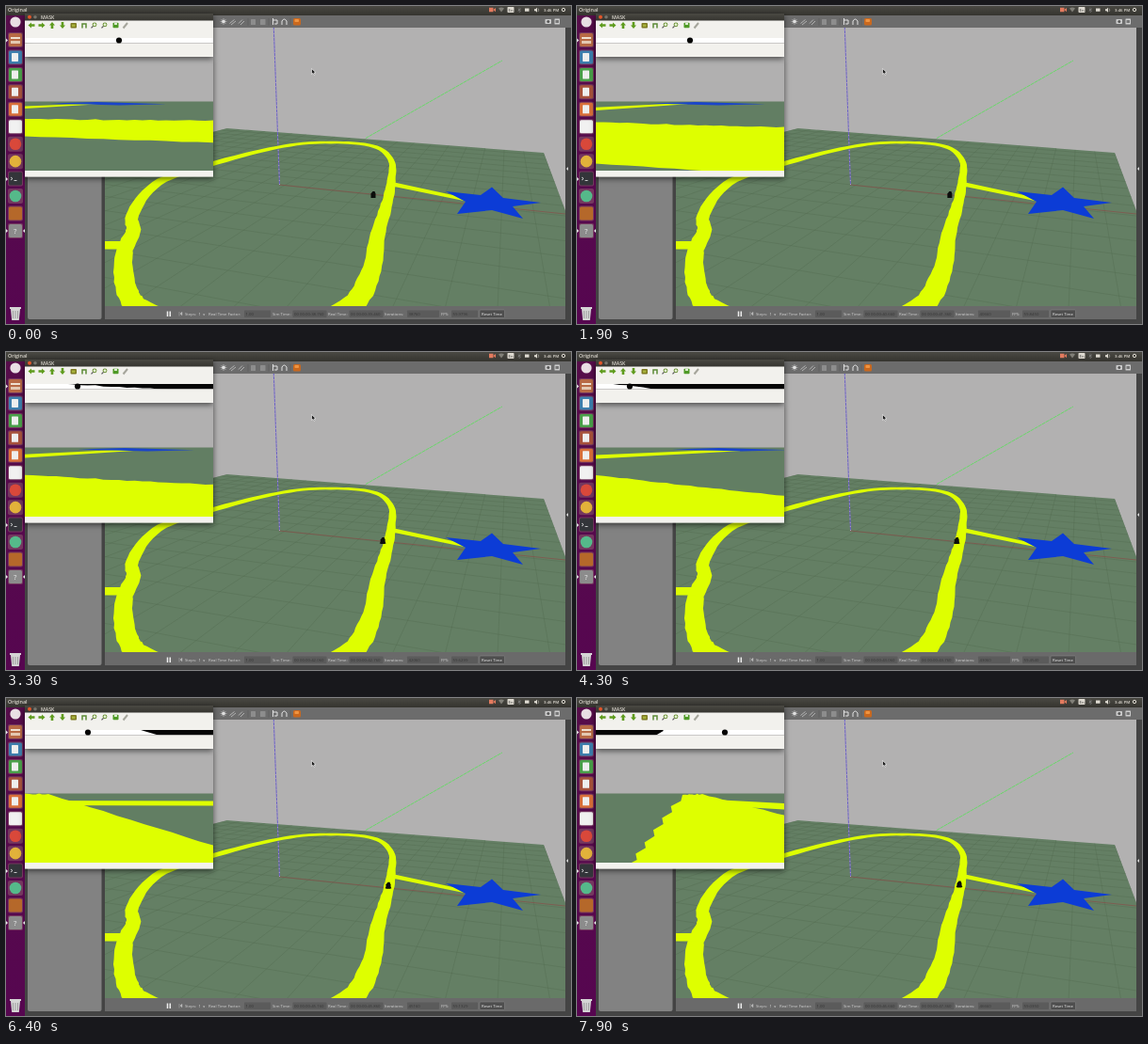
These frames come from a looping animation (600x338 px, 8 s). An HTML page:

```html
<!DOCTYPE html>
<html lang="en">
<head>
<meta charset="utf-8">
<title>Line follower simulation</title>
<style>
  html, body { margin: 0; width: 100%; height: 100%; overflow: hidden; background: #444; }
  svg { display: block; width: 100vw; height: 100vh; }
  text { font-family: "Open Sans", "Noto Sans", sans-serif; font-size: 4.3px; fill: #d2d2d2; }
  .title { font-size: 5.4px; font-weight: 600; fill: #dfdbd2; }
  .val { fill: #353535; }
  .yellow { fill: #deff00; }
</style>
</head>
<body>
<svg viewBox="0 0 600 338" preserveAspectRatio="none">
  <defs>
    <linearGradient id="dock" x2="0" y2="1">
      <stop offset="0" stop-color="#560d4a"/><stop offset="1" stop-color="#560650"/>
    </linearGradient>
    <linearGradient id="bar" x2="0" y2="1">
      <stop offset="0" stop-color="#4a4943"/><stop offset="1" stop-color="#35342f"/>
    </linearGradient>
    <clipPath id="scene"><rect x="105" y="23" width="489" height="296"/></clipPath>
    <clipPath id="floor"><path d="M235 130 571 156 600 234V320H105V163Z"/></clipPath>
    <clipPath id="camera"><rect x="20" y="54" width="200" height="121"/></clipPath>
    <clipPath id="strip"><rect x="20" y="34" width="200" height="5.3"/></clipPath>
    <filter id="shadow" x="-10%" y="-10%" width="120%" height="150%">
      <feDropShadow dx="0" dy="2" stdDeviation="3" flood-opacity=".6"/>
    </filter>
    <filter id="soft"><feGaussianBlur stdDeviation=".45"/></filter>
  </defs>

  <!-- simulator window -->
  <rect width="600" height="338" fill="#444"/>
  <rect x="22" y="10" width="578" height="13" fill="#6c6c6c"/>
  <rect x="23" y="23" width="78.500" height="310" rx="2" fill="#828282"/>
  <path d="M103 171v5" stroke="#aaa" stroke-width=".7" stroke-dasharray="1 1"/>
  <g id="tools"></g>

  <g clip-path="url(#scene)">
    <rect x="105" y="23" width="489" height="296" fill="#b2b1b1"/>
    <path d="M235 130 571 156 600 234V320H105V163Z" fill="#647f64"/>
    <path id="grid" clip-path="url(#floor)" fill="none" stroke="#50684f" stroke-width=".5" opacity=".75"/>
    <path d="M290 190 594 221" stroke="#874f49" stroke-width=".7"/>
    <path d="M382 140.500 527 58" stroke="#6ad86a" stroke-width="1" stroke-dasharray="4 .6"/>
    <path d="M290.500 190 284.300 23" stroke="#6a62c6" stroke-width="1"/>
    <path d="M290.500 190 284.300 23" stroke="#b59bc6" stroke-width="1" stroke-dasharray="1 3"/>
    <g class="yellow">
      <path id="track"/>
      <path d="M105 250h21v8.500h-21zM410 187 493 205 491 208 410 191.500z"/>
    </g>
    <path d="M516 192.500 528 204 568 209 538 213 549 226 516 217 479 221 488 208 467 197 504 201Z" fill="#0c3cd6"/>
    <g id="robot" fill="#0b0d0b">
      <path d="M-2.500 3.500V-1L-.500-3.500H1.500L2.500-1V3.500Z"/>
      <path id="skirt" d="M-3.500 3 0-2 3.500 3Z"/>
    </g>
  </g>
  <path d="M597 171v4l-2-2z" fill="#ddd"/>
  <path d="M324.500 66.500v6l1.500-1.200 1 2 1-.5-.9-1.900 1.900-.1z" fill="#222" stroke="#fff" stroke-width=".6"/>

  <!-- status bar -->
  <rect x="105" y="319" width="489" height="14" fill="#6a6a6a"/>
  <path d="M171.500 324.500v5.500M174.300 324.500v5.500" stroke="#eee" stroke-width="1.500"/>
  <path d="M184 325v4.500M185 327l2-1.700v3.500z" stroke="#bbb" stroke-width=".5" fill="#bbb"/>
  <path d="M209 327.500h2.400l-1.200 1.500z" fill="#ccc"/>
  <g id="status"></g>
  <rect x="503" y="323" width="26.500" height="8.500" rx="1" fill="#4e4e4e" stroke="#8a8a8a" stroke-width=".5"/>
  <text x="505" y="328.900" style="fill:#eee">Reset Time</text>

  <!-- desktop bar -->
  <rect width="600" height="10" fill="url(#bar)"/>
  <text class="title" x="2" y="6.300">Original</text>
  <g fill="#dfdbd2">
    <path d="M513 1.700h4.500v4.500H513zM517.500 4 520 2v4.200z" fill="#e27a5e"/>
    <path d="M523 2.500q3-2 6 0l-3 4z" opacity=".4"/>
    <rect x="532.500" y="1" width="7" height="6" rx=".8"/>
    <path d="M545 1.500v5.200l1.700-1.400-3-2.400m0 2.200 3-2.200z" fill="none" stroke="#888" stroke-width=".5"/>
    <path d="M551 2.600h4.500v3.200H551zM561 3.200h1.300l1.700-1.500v5l-1.700-1.500H561z"/>
    <path d="M565 2.500q1.500 1.700 0 3.500" fill="none" stroke="#dfdbd2" stroke-width=".5"/>
    <circle cx="592" cy="4" r="1.700" fill="none" stroke="#dfdbd2" stroke-width="1"/>
  </g>
  <text x="533.500" y="5.700" style="fill:#333">En</text>
  <text class="title" x="571" y="5.700" style="font-size:4.300px">3:46 PM</text>

  <!-- launcher -->
  <rect y="10" width="20" height="328" fill="url(#dock)"/>
  <g id="icons"></g>
  <path d="M0 34.500v4l2-2zM0 182v4l2-2zM0 237v4l2-2zM20 237v4l-2-2z" fill="#eee"/>

  <!-- camera window -->
  <rect x="20" y="54" width="200" height="127.500" fill="#f3f2ee" filter="url(#shadow)"/>
  <g clip-path="url(#camera)">
    <rect x="20" y="54" width="200" height="48" fill="#b1b0b0"/>
    <rect x="20" y="101.500" width="200" height="74" fill="#627e63"/>
    <path id="branch" class="yellow"/>
    <path id="star" fill="#1a44ca"/>
    <path id="line" class="yellow" filter="url(#soft)"/>
  </g>

  <!-- mask window: a thin slice of the camera view, thresholded -->
  <rect x="20" y="8" width="200" height="46" fill="#f2f1ed" filter="url(#shadow)"/>
  <path d="M20 8h200v7.500H20z" fill="url(#bar)"/>
  <circle cx="25" cy="11.800" r="2" fill="#e2562a"/>
  <circle cx="31" cy="11.800" r="1.800" fill="#77756d"/>
  <text class="title" x="37" y="13.800" style="font-size:5.200px">MASK</text>
  <g id="buttons"></g>
  <g clip-path="url(#strip)">
    <rect x="20" y="34" width="200" height="6" fill="#050505"/>
    <use href="#line" y="-99" style="filter:brightness(5) grayscale(1) brightness(5)"/>
  </g>
  <circle id="ball" cy="36.500" r="3.100" fill="#050505"/>
</svg>

<script>
const LOOP = 8000, STEP = 100;
const $ = id => document.getElementById(id);
const set = (id, name, value) => $(id).setAttribute(name, value);
const mix = (a, b, k) => a + (b - a) * k;
const ramp = (t, from, to) => Math.max(0, Math.min(1, (t - from) / (to - from)));
const smooth = k => k * k * (3 - 2 * k);
const noise = n => { const v = Math.sin(n * 12.9898) * 43758.5453; return (v - Math.floor(v)) * 2 - 1; };
const toPath = pts => 'M' + pts.map(p => p.map(v => v.toFixed(2)).join(' ')).join('L') + 'Z';
const rect = (x, y, w, h, fill, r = 0) =>
  `<rect x="${x}" y="${y}" width="${w}" height="${h}" rx="${r}" fill="${fill}"/>`;
const dot = (x, y, r, fill) => `<circle cx="${x}" cy="${y}" r="${r}" fill="${fill}"/>`;
const stroke = (d, color, width) => `<path d="${d}" fill="none" stroke="${color}" stroke-width="${width}"/>`;

// Perspective grid: one family per vanishing point.
function drawGrid() {
  let d = '';
  for (let i = 0; i <= 20; i++) {
    const t = i / 20, f = t / (t + 1.286 * (1 - t));
    const x = 235 + 336 * f, y = 130 + 26 * f;
    d += `M${x} ${y}L${533 + (x - 533) * 9} ${55 + (y - 55) * 9}`;
    const px = 531 - 390 / (i / 10 + 0.62), py = 190 - (px - 290) * 0.54;
    const slope = (py - 5) / (px + 1400);
    d += `M100 ${py + (100 - px) * slope}L600 ${py + (600 - px) * slope}`;
  }
  set('grid', 'd', d);
}

// Smooth course through a few knots; the tape widens with nearness and
// is foreshortened where it runs across the view.
function drawTrack() {
  const knots = [
    [310, 344], [366, 319], [387, 284], [395, 243], [405, 208], [409, 186], [409, 164],
    [390, 149], [345, 145], [295, 149], [225, 166], [163, 187], [135, 220],
    [135, 240], [125, 264], [128, 300], [144, 322], [200, 344]];
  const at = i => knots[Math.max(0, Math.min(knots.length - 1, i))];
  const spline = (i, t) => [0, 1].map(c => {
    const [a, b, e, f] = [at(i - 1)[c], at(i)[c], at(i + 1)[c], at(i + 2)[c]];
    return b + t / 2 * (e - a + t * (2 * a - 5 * b + 4 * e - f + t * (3 * (b - e) + f - a)));
  });
  const mid = [], left = [], right = [];
  for (let i = 0; i < knots.length - 1; i++)
    for (let j = 0; j < 8; j++) mid.push(spline(i, j / 8));
  mid.forEach(([x, y], i) => {
    const a = mid[Math.max(0, i - 1)], b = mid[Math.min(mid.length - 1, i + 1)];
    const dx = b[0] - a[0], dy = b[1] - a[1], len = Math.hypot(dx, dy);
    const w = (y - 110) * (0.075 + 0.045 * Math.abs(dy) / len);
    const side = (s, n) => {
      const h = s * w * (0.5 + noise(n) * 0.035);
      return [x - dy / len * h, y + dx / len * h];
    };
    left.push(side(1, i + 1));
    right.unshift(side(-1, i + 500));
  });
  set('track', 'd', toPath(left.concat(right)));
}

function drawIcons() {
  const colors = ['#b86a45', '#3d7fae', '#4aa04a', '#a8533c', '#d9703a', '#f1f1f1',
    '#d9483a', '#e2b23a', '#33353a', '#55b98a', '#b5682a', '#8c8c8c'];
  const round = ['#e2b23a', '#55b98a', '#d9483a'];
  let s = dot(10, 17, 5.6, '#e9dfe4');
  colors.forEach((c, i) => {
    const y = 36 + i * 18.45;
    s += rect(2, y - 8, 16, 16, '#74385f', 2);
    s += round.includes(c) ? dot(10, y, 6.3, c) : rect(3, y - 7, 14, 14, c, 1.5);
    if (i > 0 && i < 5) s += rect(6, y - 4.5, 7, 9, '#eee', .6);
  });
  s += rect(5, 33, 10, 2, '#efe0d0') + rect(5, 37, 10, 3, '#e4c9b2');
  s += stroke('M5 182l2 1.500-2 1.500M8.500 185.500h3', '#eee', .8);
  s += '<text x="8" y="242" style="font-size:8px;fill:#eee">?</text>';
  s += '<path d="M5 322h10l-1.200 12H6.200zM4 320h12v2H4z" fill="#d5d5d5"/>' +
    stroke('M7.500 324v8M10 324v8M12.500 324v8', '#888', .7);
  $('icons').innerHTML = s;
}

function drawButtons() {
  const green = '#5f9c1e';
  let s = '';
  [0, 180, 90, 270].forEach((turn, i) => {
    s += `<path transform="translate(${27 + 11 * i} 20.5) rotate(${turn})"
      d="M-3.500 0 0-3v1.700H3.500V1.300H0V3Z" fill="${green}"/>`;
  });
  s += rect(68.5, 18, 6.5, 5.5, '#7d7a22', 1) + rect(70, 19.5, 3.5, 2.5, '#a7b23c');
  s += stroke('M81 23.500v-4.500h4v4.500', '#5c8a36', 1.5);
  for (const x of [94, 105])
    s += dot(x, 19.8, 2.4, '#648b2b') + dot(x, 19.8, 1.5, '#e3efd2') +
      stroke(`M${x - 1.5} 21.3l-2 2`, '#555', 1.2);
  s += rect(113.5, 17.8, 6, 5.5, '#4f9a26', .8) + rect(115, 18, 3, 2, '#dcebd0');
  s += stroke('M124.500 23.500 129 18', '#a5a59b', 2);
  $('buttons').innerHTML = s;
}

function drawTools() {
  let s = dot(231, 16.5, 1.8, '#e6e6e6') +
    stroke('M231 13v7M227.500 16.500h7M228.500 14l5 5M233.500 14l-5 5', '#ddd', .5) +
    stroke('M237.500 18.500l5-4M239 20l5-4M247 18.500l4-4M249 20l4-4', '#c4c4c4', .8) +
    stroke('M283.500 13v7M284 15h4v4h-3M293 20v-4q2.500-4 5 0v4', '#e2e2e2', 1) +
    stroke('M257 13v8M279 13v8M302 13v8', '#555', .5);
  s += rect(260, 14, 5, 6, '#8d8d8d', .5) + rect(270, 14, 5.5, 6, '#8d8d8d', .5);
  s += rect(305, 13, 8, 7.5, '#c9681e', 1.5) + rect(306.5, 14, 4.5, 3, '#ef9442', .8);
  s += rect(572.5, 14, 6.5, 5, '#ccc', .8) + dot(575.8, 16.5, 1.5, '#555');
  s += rect(582.5, 13.5, 5.5, 6, '#ccc', .5) + rect(583.5, 15, 3.5, 3, '#777');
  $('tools').innerHTML = s;
}

function drawStatus() {
  const label = (x, s) => `<text x="${x}" y="328.9">${s}</text>`;
  const field = (x, name, bx, w, id) => label(x, name) + rect(bx, 323.5, w, 7.5, '#5b5b5b', .8) +
    `<text class="val" id="${id}" x="${bx + 1.5}" y="328.9"></text>`;
  $('status').innerHTML = label(190, 'Steps:') + label(204.5, '1') +
    field(215, 'Real Time Factor:', 253, 28, 'rtf') + field(283, 'Sim Time:', 304.5, 36, 'sim') +
    field(342, 'Real Time:', 364.5, 36, 'real') + field(402, 'Iterations:', 426, 34, 'iter') +
    field(462, 'FPS:', 473, 28, 'fps');
  $('rtf').textContent = '1.00';
}

// Roughens a polygon; its closing side gets sawteeth.
function ragged(corners, teeth) {
  const out = [], n = 12;
  corners.forEach(([x0, y0], i) => {
    const [x1, y1] = corners[(i + 1) % corners.length];
    const tooth = i === corners.length - 1 ? teeth : 0;
    for (let s = 0; s < n; s++)
      out.push([mix(x0, x1, s / n) + tooth * (s % 2 - 0.5),
        mix(y0, y1, s / n) + noise(i * n + s + 3) * 0.6]);
  });
  return out;
}

// The robot nears the line until 5200 ms, then turns onto it in two stages.
function drawCamera(t) {
  const near = ramp(t, 0, 5200), turn = ramp(t, 5200, 6400), settle = ramp(t, 6400, 7900);
  const stage = (a, b, c) => mix(mix(a, b, turn), c, settle);
  const farL = 120 + 11 * smooth(ramp(t, 900, 3600));
  const farR = 122 + 44 * near ** 1.8;
  const nearL = Math.min(178, 139 + 29 * (t / 1900) ** 3);
  const nearR = Math.min(185, 145 + 35 * (t / 1900) ** 1.6);
  set('line', 'd', toPath(ragged([
    [stage(20, 5, 112), stage(farL, 102, 103)],
    [stage(120, 45, 133), stage((farL + farR) / 2, 102, 102)],
    [220, stage(farR, 157, 125)],
    [220, nearR],
    [stage(20, -35, 56), nearL]], settle * 6)));

  const x = stage(20, 20, 135), y = stage(106.5 + 3.5 * near, 109, 107.5);
  const endX = 112 + 108 * near ** 3, endY = stage(103, 109.5, 112);
  set('branch', 'd', toPath([[x, y], [endX, endY],
    [endX, endY + stage(0.6 + 1.9 * near, 5, 6.5)], [x, y + stage(2.5 + 2 * near, 5, 6)]]));

  const c = 108 + 30 * ramp(t, 0, 1000) + 47 * ramp(t, 3300, 5200) + 160 * turn;
  set('star', 'd', toPath([[c - 62, 103.4], [c - 12, 102], [c + 62, 104.2], [c + 12, 105.4]]));
  set('ball', 'cx', 120 - 44 * ramp(t, 2200, 3300) - 38 * ramp(t, 3300, 5200) + 49 * turn + 70 * settle);
}

function draw(t) {
  drawCamera(t);
  set('robot', 'transform',
    `translate(${390 + 16 * ramp(t, 0, 5200)} ${200.5 - 2.5 * ramp(t, 4800, 7900)})`);
  set('skirt', 'opacity', t < 3000 ? 0 : 1);

  const sim = 38.76 + t / 1000;
  const clock = s => '00 00:00:' + s.toFixed(3);
  $('sim').textContent = clock(sim);
  $('real').textContent = clock(sim + 0.7);
  $('iter').textContent = Math.round(sim * 1000);
  $('fps').textContent = (59.9796 - 0.945 * smooth(t / LOOP)).toFixed(4);
}

drawGrid();
drawTrack();
drawIcons();
drawButtons();
drawTools();
drawStatus();

const start = performance.now();
function tick() {
  const t = (performance.now() - start) % LOOP;
  draw(Math.floor(t / STEP) * STEP);
  requestAnimationFrame(tick);
}
tick();
</script>
</body>
</html>
```
